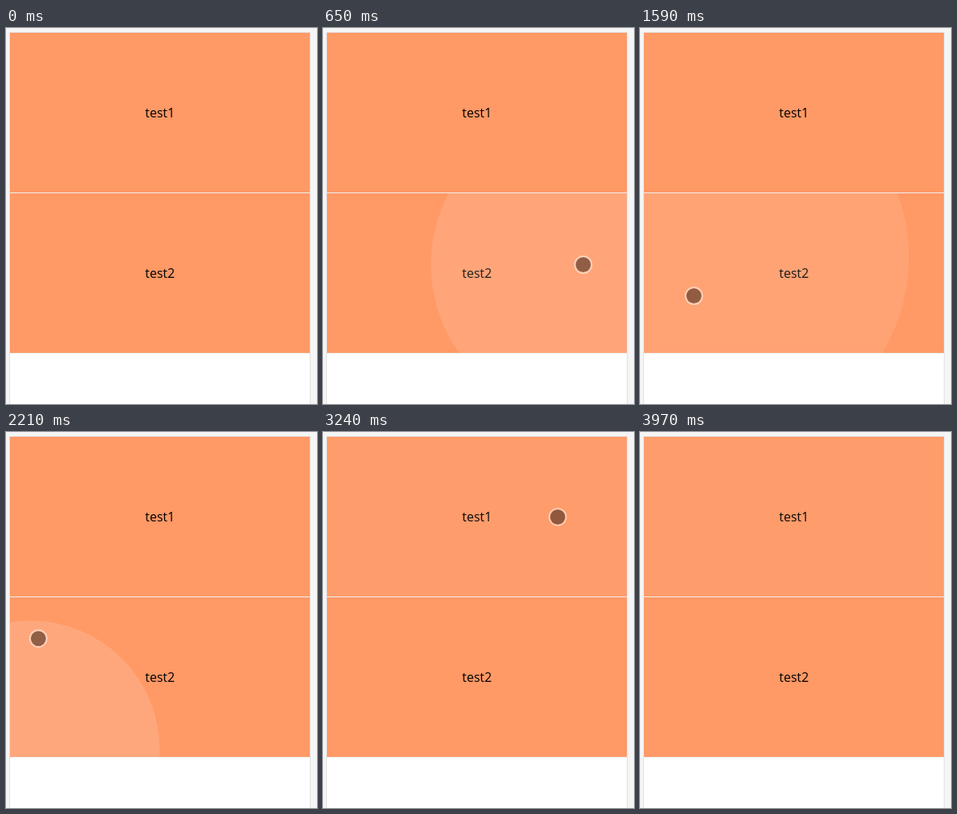
Animation, 389 px wide and 471 px high, one loop 4.43 s. Source, as an HTML page:

```html
<!DOCTYPE html>
<html lang="en">
<head>
<meta charset="utf-8">
<title>Ripple</title>
<style>
  html, body { margin: 0; width: 100%; height: 100%; overflow: hidden; background: #f5f5f5; }
  svg { display: block; }
  text { font: 16px "Open Sans", "Noto Sans", sans-serif; fill: #000; }
  .panel { fill: #ff9966; }
  .wave { fill: #fff; }
  .dot { fill: rgba(0, 0, 0, .43); }
  .ring { fill: none; stroke: rgba(255, 255, 255, .48); stroke-width: 2px; }
</style>
</head>
<body>
<svg width="389" height="471" viewBox="0 0 389 471">
  <clipPath id="top"><rect x="5" y="6" width="375" height="200"/></clipPath>
  <clipPath id="low"><rect x="5" y="207" width="375" height="200"/></clipPath>
  <rect width="389" height="471" fill="#f5f5f5"/>
  <rect x="4" y="5" width="377" height="470" fill="#e2e2e2"/>
  <rect x="5" y="6" width="375" height="466" fill="#fff"/>
  <rect x="5" y="206" width="375" height="1" fill="#eee"/>
  <rect x="5" y="407" width="375" height="1" fill="#eee"/>
  <rect class="panel" x="5" y="6" width="375" height="200"/>
  <rect class="panel" x="5" y="207" width="375" height="200"/>
  <text x="174" y="112">test1</text>
  <text x="174" y="313">test2</text>
  <g clip-path="url(#top)"><circle class="wave" id="topWave"/></g>
  <g clip-path="url(#low)"><circle class="wave" id="lowWave"/></g>
  <g id="cursor">
    <circle class="dot" r="9.5"/>
    <circle class="ring" r="10.5"/>
  </g>
</svg>
<script>
  const LOOP = 4430, STEP = 78.8, FIRST = 170, LAST_STEP = 48;
  const LIFE = 600, DELAY = 80, REACH = 375, GLOW = 0.25;
  const LEAD = 80, HOLD = 140;

  const point = (at, x, y) => ({ at, x, y });

  const taps = [
    point(338, 325.5, 296.5), point(1215, 103, 287), point(1960, 30.5, 398),
    point(2715, 86.5, 122.5), point(3425, 310.5, 100.5)
  ];

  // Where the cursor enters, lingers, bends and leaves between taps.
  const bends = [
    point(FIRST, 332, 423), point(800, 325.5, 296.5), point(1588, 67.5, 335.5),
    point(2219, 40.5, 258.5), point(2377, 79, 149), point(3243, 293.5, 106.5),
    point(3873, 326, 442)
  ];

  // The cursor rests on each tap for a moment before and after it.
  const rests = taps.flatMap(({ at, x, y }) => [point(at - LEAD, x, y), point(at + HOLD, x, y)]);
  const path = [...rests, ...bends].sort((a, b) => a.at - b.at);

  const [topWave, lowWave, cursor] =
    ["topWave", "lowWave", "cursor"].map(id => document.getElementById(id));
  const set = (node, attrs) => {
    for (const key in attrs) node.setAttribute(key, attrs[key]);
  };
  const mix = (a, b, k) => a + (b - a) * k;

  function drawCursor(t) {
    const i = path.findIndex(p => p.at > t);
    set(cursor, { visibility: i > 0 ? "visible" : "hidden" });
    if (i < 1) return;
    const a = path[i - 1], b = path[i];
    const k = (t - a.at) / (b.at - a.at);
    set(cursor, { transform: `translate(${mix(a.x, b.x, k)} ${mix(a.y, b.y, k)})` });
  }

  function drawWave(node, t, inPanel) {
    const tap = taps.find(({ at, y }) => inPanel(y) && t >= at + DELAY && t < at + LIFE);
    if (!tap) return set(node, { r: 0 });
    const p = (t - tap.at) / LIFE;
    set(node, { cx: tap.x, cy: tap.y, r: REACH * p, "fill-opacity": GLOW * (1 - p) });
  }

  function draw(now) {
    // The picture advances in even steps and rests on the last one.
    const step = Math.floor((now % LOOP - FIRST + 15) / STEP);
    const t = step < 0 ? 0 : FIRST + Math.min(step, LAST_STEP) * STEP;
    drawWave(topWave, t, y => y < 206);
    drawWave(lowWave, t, y => y > 206);
    drawCursor(t);
  }

  const origin = performance.now();
  function tick() {
    draw(performance.now() - origin);
    requestAnimationFrame(tick);
  }
  tick();
</script>
</body>
</html>
```
